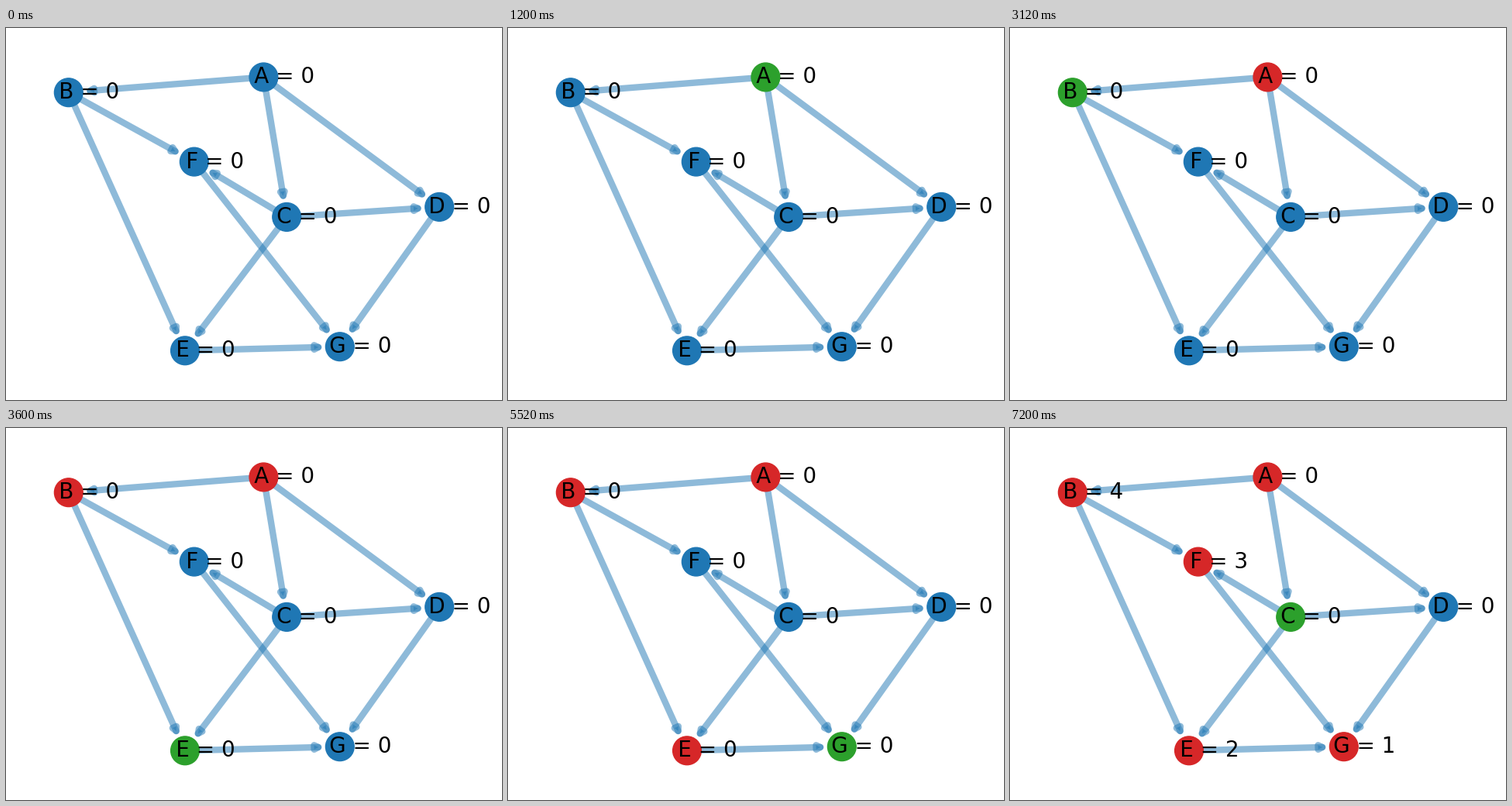
A matplotlib script for the animation above (8 s loop, 640 by 480 pixels).

```python
import matplotlib.pyplot as plt
from matplotlib.animation import FuncAnimation
from matplotlib.patches import FancyArrowPatch

WIDTH, HEIGHT, DPI = 640, 480, 100
FRAMES, INTERVAL = 20, 400
FRAMES_PER_STEP = 3

NODE_SIZE = 700
UNSEEN, CURRENT, SEEN = "tab:blue", "tab:green", "tab:red"

NODES = {
    "A": (332.4, 63.4),
    "B": (80.8, 83.2),
    "C": (362.2, 243.9),
    "D": (559.2, 230.9),
    "E": (231.0, 416.3),
    "F": (242.8, 172.6),
    "G": (430.8, 411.2),
}
EDGES = "AB AC AD BE BF CD CE CF DG EG FG".split()

# Order of visits, and the step at which each finished node gets its number.
VISITS = "ABEGFC"
FINISHED = {"G": (5, 1), "E": (5, 2), "F": (6, 3), "B": (6, 4)}

plt.rcParams["font.family"] = "DejaVu Sans"
fig = plt.figure(figsize=(WIDTH / DPI, HEIGHT / DPI), dpi=DPI, facecolor="white")
ax = fig.add_axes([0, 0, 1, 1])
ax.set_xlim(0, WIDTH)
ax.set_ylim(HEIGHT, 0)
ax.axis("off")

margin = NODE_SIZE ** 0.5 / 2
for start, end in EDGES:
    ax.add_patch(FancyArrowPatch(
        NODES[start], NODES[end], arrowstyle="-|>", mutation_scale=10,
        shrinkA=margin, shrinkB=margin, color="tab:blue", alpha=0.5,
        linewidth=6, zorder=1))

xs, ys = zip(*NODES.values())
dots = ax.scatter(xs, ys, s=NODE_SIZE, c=UNSEEN, linewidths=1, zorder=2)
labels = {name: ax.text(x, y, "", size=20, ha="center", va="center", zorder=3)
          for name, (x, y) in NODES.items()}


def node_color(name, step):
    if name in VISITS[:max(step - 1, 0)]:
        return SEEN
    if step and name == VISITS[step - 1]:
        return CURRENT
    return UNSEEN


def node_number(name, step):
    ready, number = FINISHED.get(name, (0, 0))
    return number if step >= ready else 0


def update(frame):
    step = frame // FRAMES_PER_STEP
    colors = [node_color(name, step) for name in NODES]
    dots.set_facecolor(colors)
    dots.set_edgecolor(colors)
    for name, label in labels.items():
        # Leading spaces push the centred text right, so the letter sits on its node.
        label.set_text(f"{' ' * 6}{name} = {node_number(name, step)}")
    return [dots, *labels.values()]


anim = FuncAnimation(fig, update, frames=FRAMES, interval=INTERVAL,
                     repeat=True, repeat_delay=0)
plt.show()
```
